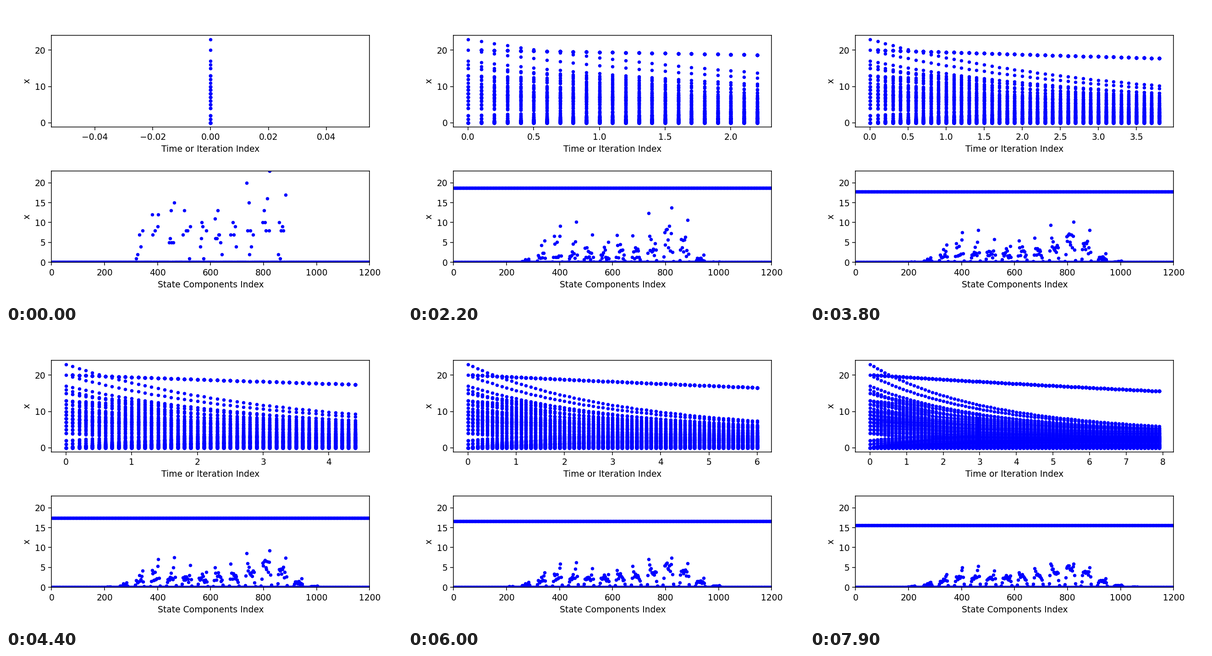
Recreate the animation shown at these times as a matplotlib script. Size 864 by 648 pixels, loop 8 s.

```python
import numpy as np
import matplotlib.pyplot as plt
from matplotlib.animation import FuncAnimation

W, H, DPI = 864, 648, 135
SIZE, KINDS = 20, 3          # square grid, three values per cell
STEPS, DT, SUB = 80, 0.1, 10
WAKE = 17                    # step at which the dormant kind becomes active
ACTIVE_RATE, DORMANT_RATE = 0.09, 0.05
SURVIVAL = 0.42
FEED, FEED_DECAY = 20, 0.032

# tallest colonies: (row, column, size)
PEAKS = [(6, 6, 12), (6, 14, 12), (7, 10, 13), (7, 14, 15), (8, 7, 13),
         (10, 5, 11), (10, 9, 13), (12, 5, 20), (12, 8, 15), (13, 7, 13),
         (13, 11, 16), (13, 14, 23), (14, 14, 17)]


def seed_cells():
    """Colonies fill the middle 10 x 10 cells; those in its core lie dormant."""
    rng = np.random.default_rng(4)
    sizes = np.zeros((SIZE, SIZE))
    filled = rng.random((10, 10)) < 0.57
    sizes[5:15, 5:15] = filled * rng.integers(1, 11, (10, 10))
    for row, col, size in PEAKS:
        sizes[row, col] = size
    core = np.zeros((SIZE, SIZE), bool)
    core[7:13, 7:12] = True
    cells = np.zeros((SIZE, SIZE, KINDS))
    cells[..., 0] = np.where(core, sizes, 0)
    cells[..., 1] = np.where(core, 0, sizes)
    return cells


def diffuse(grid, rate):
    h = DT / SUB
    for _ in range(SUB):
        p = np.pad(grid, 1, mode="edge")
        near = p[:-2, 1:-1] + p[2:, 1:-1] + p[1:-1, :-2] + p[1:-1, 2:]
        grid = grid + rate * h * (near - 4 * grid)
    return grid


def simulate():
    cells = seed_cells()
    history = [cells.flatten()]
    for n in range(1, STEPS):
        cells[..., 0] = diffuse(cells[..., 0], DORMANT_RATE)
        cells[..., 1] = diffuse(cells[..., 1], ACTIVE_RATE)
        if n == WAKE:
            cells[..., 1] += SURVIVAL * cells[..., 0]
            cells[..., 0] = 0
        cells[..., 2] = FEED * np.exp(-FEED_DECAY * (n - 1) * DT)
        history.append(cells.flatten())
    return np.array(history)


history = simulate()
count = history.shape[1]
times = np.repeat(np.arange(STEPS) * DT, count)
index = np.arange(count)

fig = plt.figure(figsize=(W / DPI, H / DPI), dpi=DPI)


def panel(bottom, xlabel):
    ax = fig.add_axes([99.4 / W, 1 - bottom / H, 693.9 / W, 199.9 / H])
    ax.set_xlabel(xlabel)
    ax.set_ylabel("x")
    return ax, ax.plot([], [], "b.")[0]


top, trail = panel(263.6, "Time or Iteration Index")
low, dots = panel(559.4, "State Components Index")
low.set_xlim(0, count)
low.set_ylim(0, 23)


def update(n):
    shown = (n + 1) * count
    trail.set_data(times[:shown], history[:n + 1].ravel())
    top.relim()
    top.autoscale_view()
    dots.set_data(index, history[n])
    return trail, dots


anim = FuncAnimation(fig, update, frames=STEPS, interval=100,
                     repeat=True, repeat_delay=0, blit=False)
plt.show()
```
